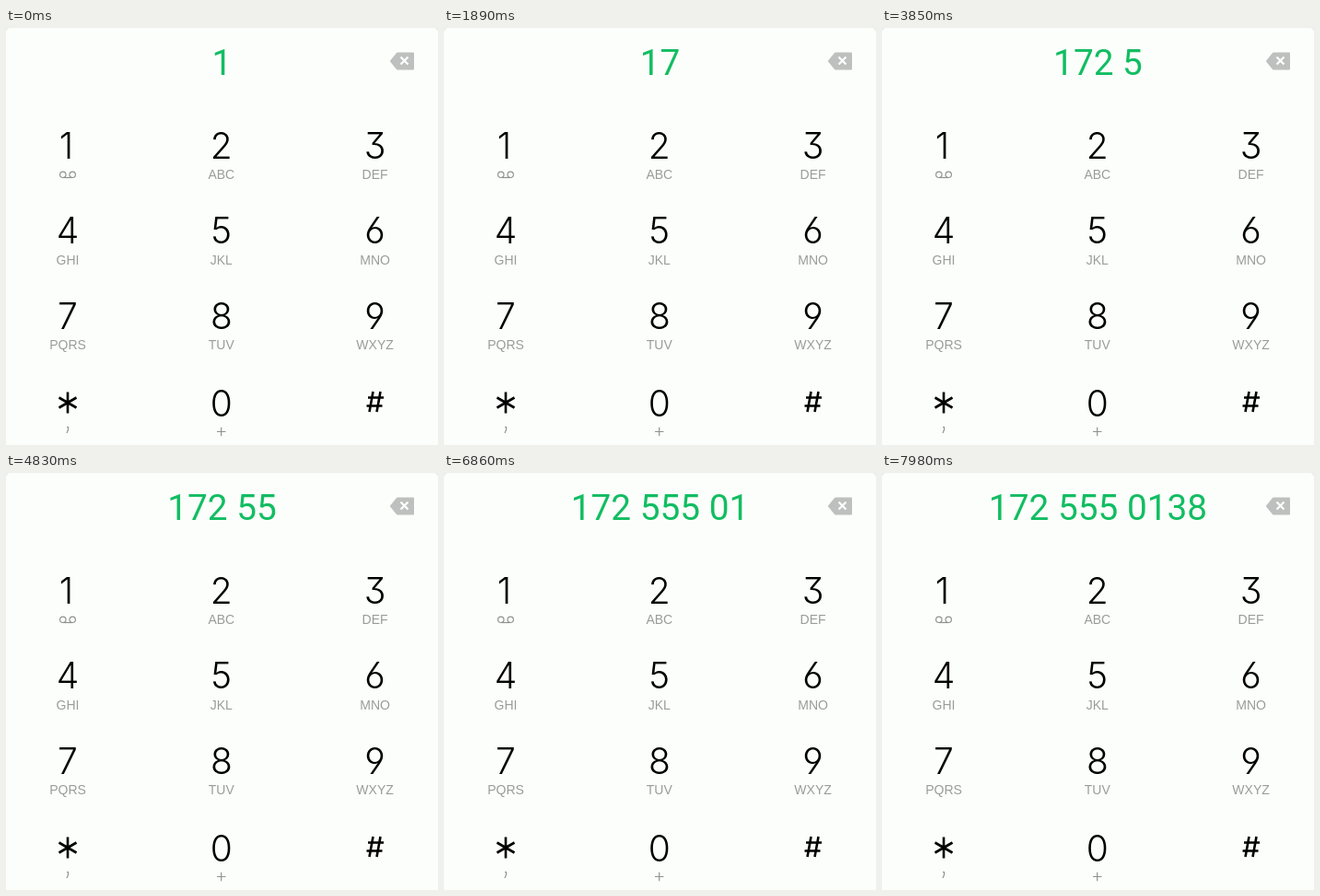
Write an HTML page that moves like this. It is 469 by 453 pixels and loops after 8 s.

```html
<!DOCTYPE html>
<html lang="en">
<head>
<meta charset="utf-8">
<title>Dial pad</title>
<style>
  html, body { margin: 0; width: 100%; height: 100%; overflow: hidden; background: #e9ecea; }
  svg { display: block; width: 100vw; height: 100vh; }
  text { text-anchor: middle; }
  #number { font: 38.8px Roboto, sans-serif; fill: #12bd62; }
  /* open 6 and 9, flat-topped 3 */
  .digit { font: 300 39px Inter, sans-serif; font-feature-settings: "cv03", "cv04", "cv09"; fill: #000; }
  .label { font: 14px "Liberation Sans", sans-serif; fill: #999c9a; }
  .line { fill: none; stroke: #8f9290; stroke-width: 1.2; }
  .symbol { fill: none; stroke: #000; stroke-width: 2.6; }
</style>
</head>
<body>
<svg viewBox="0 0 469 453">
  <rect width="469" height="470" rx="5" fill="#fcfefb"/>
  <text id="number" x="234.5" y="50.7"></text>

  <!-- backspace -->
  <path d="M418 36 L425 27.5 H442 V44.5 H425 Z" fill="#bdc0be" stroke="#bdc0be" stroke-width="2" stroke-linejoin="round"/>
  <path d="M428.5 31.5 l8 8 m0 -8 l-8 8" fill="none" stroke="#fff" stroke-width="2.2"/>

  <g id="keys"></g>

  <!-- voicemail -->
  <g class="line">
    <circle cx="61.8" cy="159.3" r="3.2"/>
    <circle cx="72.2" cy="159.3" r="3.2"/>
    <path d="M61.8 162.5 H72.2"/>
  </g>

  <!-- star, comma, plus, hash -->
  <path class="symbol" d="M67 395.5 V418.5 M57.5 401.5 L76.5 412.5 M76.5 401.5 L57.5 412.5"/>
  <path class="line" d="M66 433.5 H67.5 V436.5 L66 440"/>
  <path class="line" d="M229 438.5 H238.5 M233.7 433.8 V443.2"/>
  <path class="symbol" d="M398.5 395 L394.5 417 M406.5 395 L402.5 417 M393 401.5 H410 M391.5 410.5 H408.5"/>
</svg>
<script>
  const DURATION = 8000;
  const NUMBER = "172 555 0138";
  // When each digit after the first is typed, in ms
  const PRESSES = [1260, 2100, 2800, 4130, 4970, 5670, 6510, 7070, 7490];

  const keys = document.getElementById("keys");
  const display = document.getElementById("number");

  function addText(className, x, y, content) {
    const node = document.createElementNS("http://www.w3.org/2000/svg", "text");
    node.setAttribute("class", className);
    node.setAttribute("x", x);
    node.setAttribute("y", y);
    node.textContent = content;
    keys.append(node);
  }

  const labels = ["", "ABC", "DEF", "GHI", "JKL", "MNO", "PQRS", "TUV", "WXYZ"];
  labels.forEach((label, i) => {
    const x = 67 + (i % 3) * 166.8;
    const y = 141.7 + Math.floor(i / 3) * 92.5;
    addText("digit", i ? x : 65.5, y, i + 1);
    if (label) addText("label", x, y + 22.5, label);
  });
  addText("digit", 233.8, 422, 0);

  // The first `count` digits, keeping the spaces between groups
  function typed(count) {
    const digits = NUMBER.replaceAll(" ", "").slice(0, count);
    return [digits.slice(0, 3), digits.slice(3, 6), digits.slice(6)].filter(Boolean).join(" ");
  }

  function draw(now) {
    const time = now % DURATION;
    display.textContent = typed(1 + PRESSES.filter(press => time >= press).length);
    requestAnimationFrame(draw);
  }
  draw(0);
</script>
</body>
</html>
```
